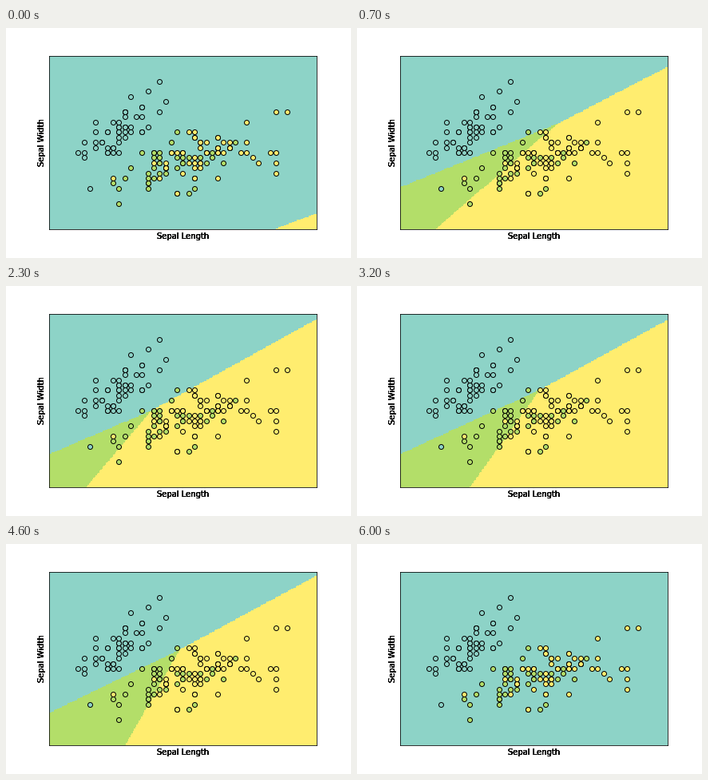
Recreate the animation shown at these times as a matplotlib script. Size 432 px wide and 288 px high, loop 6100 ms.

```python
import numpy as np
import matplotlib.pyplot as plt
from matplotlib.animation import FuncAnimation
from matplotlib.colors import ListedColormap

FRAMES, INTERVAL = 61, 100
X0, X1, Y0, Y1 = 3.8, 8.4, 1.5, 4.9
STEP = 0.02
COLORS = ["#8dd3c7", "#b3de69", "#ffed6f"]

# Iris sepals in mm: width -> lengths
SETOSA = {
    23: [45], 29: [44], 30: [43, 44, 48, 48, 49, 50], 31: [46, 48, 49, 49],
    32: [44, 46, 47, 47, 50], 33: [50, 51],
    34: [46, 48, 48, 50, 50, 51, 52, 54, 54],
    35: [50, 50, 51, 51, 52, 55], 36: [46, 49, 50], 37: [51, 53, 54],
    38: [51, 51, 51, 57], 39: [54, 54], 40: [58], 41: [52], 42: [55], 44: [57],
}
VERSICOLOR = {
    20: [50], 22: [60, 62], 23: [50, 55, 63], 24: [49, 55, 55],
    25: [51, 55, 56, 63], 26: [55, 57, 58], 27: [52, 56, 58, 58, 60],
    28: [57, 57, 61, 61, 65, 68], 29: [56, 57, 60, 61, 62, 64, 66],
    30: [54, 56, 56, 57, 59, 61, 66, 67], 31: [67, 67, 69],
    32: [59, 64, 70], 33: [63], 34: [60],
}
VIRGINICA = {
    22: [60], 25: [49, 57, 63, 67], 26: [61, 77], 27: [58, 58, 63, 64],
    28: [56, 58, 62, 63, 64, 64, 74, 77], 29: [63, 73],
    30: [59, 60, 61, 65, 65, 65, 67, 68, 71, 72, 76, 77],
    31: [64, 67, 69, 69], 32: [64, 65, 68, 69, 72], 33: [63, 67, 67],
    34: [62, 63], 36: [72], 38: [77, 79],
}

# Decision borders in pixels: step, left y, junction x, junction y,
# bottom x, slope of the border right of the junction
BORDERS = np.array([
    (0, 375, -24, 388, 50, 0.377),
    (1, 150, 480, -60, 110, 0.600),
    (2, 157, 518, -67, 95, 0.600),
    (4, 185, 300, 95, 97, 0.530),
    (7, 200, 250, 121, 98, 0.517),
    (13, 208, 215, 140.4, 100, 0.512),
    (20, 210, 192, 152, 100, 0.533),
    (23, 211, 181, 157, 100, 0.553),
    (32, 211, 228, 131, 141, 0.547),
    (46, 212, 217, 133, 149, 0.540),
    (59, 212, 214, 134, 158, 0.543),
])

LEFT, RIGHT, TOP, BOTTOM = 54, 388.8, 34.56, 252
cols, rows = round((X1 - X0) / STEP), round((Y1 - Y0) / STEP)
px, py = np.meshgrid(LEFT + (RIGHT - LEFT) * np.arange(cols) / cols,
                     BOTTOM - (BOTTOM - TOP) * np.arange(rows) / rows)


def classify(step):
    """Class index of every grid cell after a training step."""
    if step == FRAMES - 1:
        return np.zeros_like(px)
    left, jx, jy, bottom, slope = (
        np.interp(step, BORDERS[:, 0], col) for col in BORDERS[:, 1:].T)

    def line(m):
        return jy - m * (px - jx)

    upper = np.minimum(line((left - jy) / (jx - LEFT)), line(slope))
    lower = line((BOTTOM - jy) / (jx - bottom))
    return np.where(py < upper, 0, np.where(py < lower, 1, 2))


fig, ax = plt.subplots(figsize=(6, 4), dpi=72, facecolor="white")
fig.subplots_adjust(left=0.125, right=0.9, bottom=0.125, top=0.88)

mesh = ax.imshow(classify(0), cmap=ListedColormap(COLORS), vmin=0, vmax=2,
                 origin="lower", extent=(X0, X1, Y0, Y1), aspect="auto",
                 interpolation="nearest")

for species, color in zip((SETOSA, VERSICOLOR, VIRGINICA), COLORS):
    points = np.array([(x, y) for y, xs in species.items() for x in xs]) / 10
    ax.scatter(*points.T, c=color, edgecolors="k")

ax.set(xlim=(X0, X1), ylim=(Y0, Y1), xticks=[], yticks=[])

# Labels are stacked to thicken their soft edges
for _ in range(6):
    ax.annotate("Sepal Length", (0.5, 0), xycoords="axes fraction",
                xytext=(0, -4), textcoords="offset points",
                ha="center", va="top", fontsize=10)
    ax.annotate("Sepal Width", (0, 0.5), xycoords="axes fraction",
                xytext=(-4, 0), textcoords="offset points", rotation=90,
                ha="center", va="bottom", rotation_mode="anchor", fontsize=10)


def update(step):
    mesh.set_data(classify(step))
    return [mesh]


anim = FuncAnimation(fig, update, frames=FRAMES, interval=INTERVAL,
                     repeat=True, repeat_delay=0)
plt.show()
```
